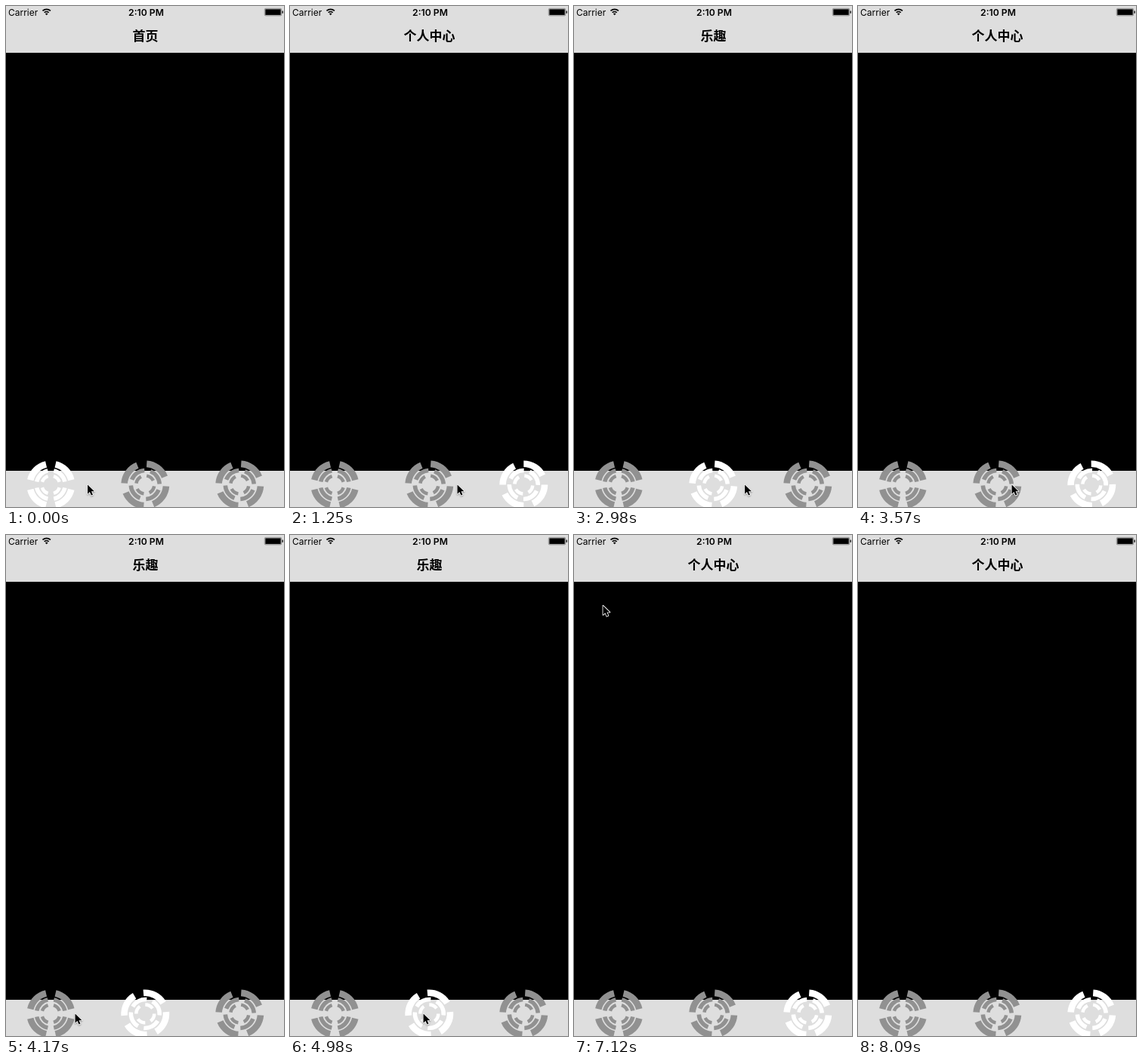
Animation, 368 px wide and 664 px high, one loop 8.36 s. Source, as an HTML page with a canvas:

```html
<!DOCTYPE html>
<html lang="zh">
<head>
<meta charset="utf-8">
<style>
html, body { margin: 0; width: 100%; height: 100%; overflow: hidden; background: #000; }
canvas { display: block; }
</style>
</head>
<body>
<canvas id="stage" width="368" height="664"></canvas>
<script>
const ctx = document.getElementById('stage').getContext('2d');
const LOOP = 8360, ROCK = 350, MOVE = 300, BAR = '#dedede', GRAY = '#919191';
const titles = ['首页', '乐趣', '个人中心'];
// [time, pointer x] of each tap; the pointer then heads for the next one
const taps = [[80, 107], [490, 206], [1080, 307], [1610, 170], [2100, 56], [2860, 150],
  [3390, 312], [3930, 147], [4450, 80], [4980, 175], [5400, 308]];

const rad = deg => deg * Math.PI / 180;
const mix = (a, b, p) => a + (b - a) * p;
const span = (t, start, end) => Math.min(1, Math.max(0, (t - start) / (end - start)));
// taps sweep back and forth over the tabs: 0 1 2 1 0 1 2 ...
const tabOf = tap => 1 - Math.round(Math.cos(tap * Math.PI / 2));

function ring(radius, width, gap, turn) {
  ctx.lineWidth = width;
  for (let start = turn - 90; start < turn + 270; start += 90) {
    ctx.beginPath();
    ctx.arc(0, 0, radius, rad(start + gap / 2), rad(start + 90 - gap / 2));
    ctx.stroke();
  }
}

function icon(tab, color, progress) {
  const rest = tab ? -9 : 0;
  const turn = rest - 9 * Math.cos(1.5 * Math.PI * progress) ** 2;
  ctx.save();
  ctx.translate(59.3 + 125 * tab, 634.5);
  ctx.strokeStyle = color;
  ring(27.7, 8.6, 26, turn);
  ring(19, 5.5, 24, -turn);
  ring(12, 4.5, 36, turn);
  ctx.restore();
}

function text(str, x, y, font, align) {
  ctx.font = font;
  ctx.textAlign = align;
  ctx.fillStyle = '#000';
  ctx.fillText(str, x, y);
}

function statusBar() {
  text('Carrier', 3, 12.5, '12px Inter, sans-serif', 'left');
  text('2:10 PM', 185.5, 12.5, '600 12.2px Inter, sans-serif', 'center');
  ctx.strokeStyle = '#000';
  ctx.lineWidth = 1.7;
  for (const r of [4.2, 7.4]) {
    ctx.beginPath();
    ctx.arc(53.7, 11.7, r, rad(-135), rad(-45));
    ctx.stroke();
  }
  ctx.beginPath();
  ctx.moveTo(53.7, 12.2);
  ctx.arc(53.7, 12.2, 2.6, rad(-135), rad(-45));
  ctx.fill();
  ctx.strokeStyle = '#555';
  ctx.lineWidth = 0.6;
  ctx.beginPath();
  ctx.roundRect(342.3, 3.3, 22.4, 9.6, 1.5);
  ctx.stroke();
  ctx.fillRect(343.3, 4.3, 20.4, 7.6);
  ctx.fillRect(365.5, 6.5, 1.3, 3.2);
}

// pointer position, or nothing while it is off the stage
function pointerAt(t, tap) {
  if (t < 5850) {
    const [start, x] = taps[tap];
    const next = taps[tap + 1] || taps[tap];
    const p = span(t, start, start + MOVE);
    return [mix(x, next[1], p * (1.25 - 0.25 * p)), 633 - 14 * span(t, 5600, 5850)];
  }
  if (t < 6360) {
    const p = span(t, 5850, 6360);
    return [mix(197, 308, (1 - p) ** 3), mix(619, 331, p * p)];
  }
  if (t >= 6770 && t < 6830) return [86, 80];
  if (t >= 7070 && t < 8090) {
    const p = span(t, 7070, 8090);
    return [2 + 355 * Math.sin(2 * p), mix(666, 51, (1 - p) ** 1.35)];
  }
}

const arrow = new Path2D('M0 0V14.5L3.4 11.3L5.8 16.8L8.3 15.7L6 10.4H10.7Z');
function pointer(x, y) {
  ctx.save();
  ctx.translate(x + 1, y + 1.5);
  ctx.scale(0.84, 0.84);
  ctx.lineJoin = 'round';
  ctx.lineWidth = 2;
  ctx.strokeStyle = '#fff';
  ctx.shadowColor = 'rgba(0,0,0,.35)';
  ctx.shadowBlur = 2;
  ctx.shadowOffsetY = 1;
  ctx.stroke(arrow);
  ctx.shadowColor = 'transparent';
  ctx.fillStyle = '#000';
  ctx.fill(arrow);
  ctx.restore();
}

function draw() {
  const t = performance.now() % LOOP;
  const tap = Math.max(0, taps.filter(([time]) => time <= t).length - 1);
  const active = tabOf(tap), start = taps[tap][0];
  ctx.fillStyle = '#000';
  ctx.fillRect(0, 0, 368, 664);
  ctx.fillStyle = BAR;
  ctx.fillRect(0, 0, 368, 62);
  ctx.fillRect(0, 616, 368, 48);
  statusBar();
  text(titles[active], 184.5, 46, '700 17px "Noto Sans CJK SC", "Noto Sans CJK", sans-serif', 'center');
  for (let tab = 0; tab < 3; tab++) {
    const rocking = tab === active && t >= start;
    icon(tab, tab === active ? '#fff' : GRAY, rocking ? span(t, start, start + ROCK) : 1);
  }
  const spot = pointerAt(t, tap);
  if (spot) pointer(...spot);
  requestAnimationFrame(draw);
}
draw();
</script>
</body>
</html>
```
